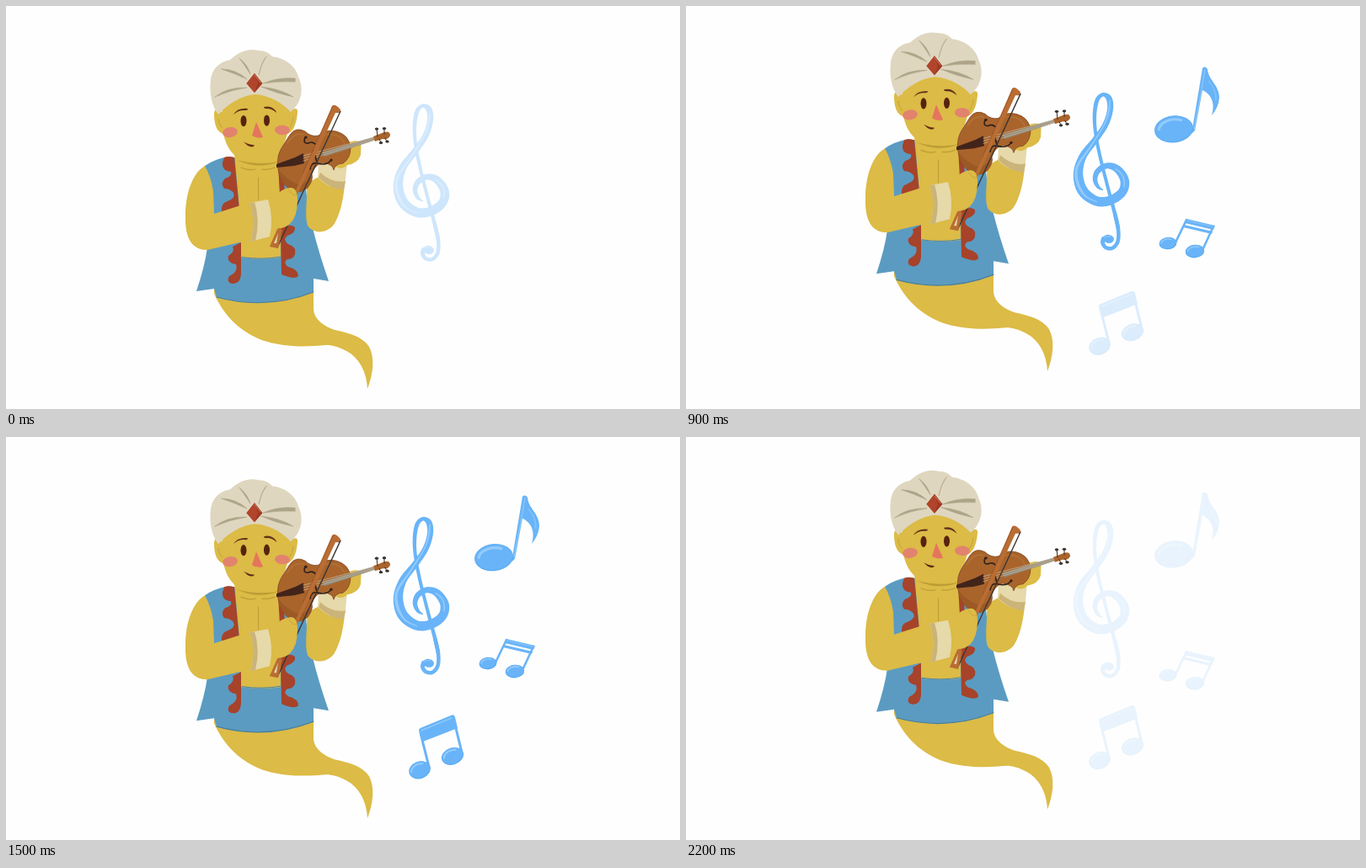
These frames come from a looping animation (800 by 479 pixels, 2300 ms). An HTML page with a canvas:

```html
<!DOCTYPE html>
<html lang="en">
<head>
<meta charset="utf-8">
<title>Violin genie</title>
<style>
html, body { margin: 0; width: 100%; height: 100%; overflow: hidden; background: #fefefe; }
canvas { display: block; width: 800px; height: 479px; }
</style>
</head>
<body>
<canvas id="stage"></canvas>
<script>
const LOOP = 2300, STEP = 100, W = 800, H = 479;
const BG = '#fefefe', SKIN = '#dcbb46', SKIN_DARK = '#bd9c35', BLUE = '#5b9bc1', RED = '#a6432a',
  WOOD = '#a9642c', WOOD_DARK = '#7f451d', BOW = '#b96d33', DARK = '#42241a',
  CREAM = '#dfd6bf', FOLD = '#aea488', CUFF = '#e6d9aa', CUFF_DARK = '#cbb47a',
  NOTE = '#69b4f8', SHINE = '#93cbfb', DEEP = '#55a7f2';

const ratio = window.devicePixelRatio || 1;
const canvas = document.getElementById('stage');
const layer = document.createElement('canvas');
canvas.width = layer.width = W * ratio;
canvas.height = layer.height = H * ratio;
const screen2d = canvas.getContext('2d');
const layer2d = layer.getContext('2d');
let ctx = screen2d;

function fill(d, color) {
  ctx.fillStyle = color;
  ctx.fill(d instanceof Path2D ? d : new Path2D(d));
}

function line(d, color, width) {
  ctx.strokeStyle = color;
  ctx.lineWidth = width;
  ctx.stroke(new Path2D(d));
}

function oval(x, y, rx, ry, color, turn = 0) {
  ctx.beginPath();
  ctx.ellipse(x, y, rx, ry, turn, 0, 7);
  ctx.fillStyle = color;
  ctx.fill();
}

// Smooth curve through [x, y, width] points, with a changing width.
function ribbon(pts) {
  const left = [], right = [];
  const mix = (a, b, c, d, u) => 0.5 * (2 * b + (c - a) * u +
    (2 * a - 5 * b + 4 * c - d) * u * u + (3 * b - a - 3 * c + d) * u * u * u);
  const at = (i, u) => [0, 1, 2].map(k => mix(
    pts[Math.max(i - 1, 0)][k], pts[i][k], pts[i + 1][k],
    pts[Math.min(i + 2, pts.length - 1)][k], u));
  for (let i = 0; i < pts.length - 1; i++) {
    for (let n = 0; n <= 10; n++) {
      const u = n / 10, p = at(i, u);
      const a = at(i, Math.max(u - 0.01, 0)), b = at(i, Math.min(u + 0.01, 1));
      const dx = b[0] - a[0], dy = b[1] - a[1], r = p[2] / 2 / (Math.hypot(dx, dy) || 1);
      left.push([p[0] - dy * r, p[1] + dx * r]);
      right.unshift([p[0] + dy * r, p[1] - dx * r]);
    }
  }
  const path = new Path2D();
  left.concat(right).forEach(([x, y]) => path.lineTo(x, y));
  path.closePath();
  return path;
}

const clefBody = ribbon([
  [513, 278, 4.5], [509, 260, 4.5], [500, 226, 4], [491, 190, 4], [486, 163, 4], [485, 142, 4.5],
  [488, 125, 5], [495, 118.5, 4.5], [502, 123, 7], [503.5, 136, 7], [498, 154, 7], [486, 172, 7.5],
  [471, 192, 9], [465.5, 213, 11.5], [471, 233, 12.5], [487, 245, 11.5], [504, 244, 11],
  [518, 234, 10.5], [520.5, 220, 10.5], [512, 207, 9], [500, 203, 7], [489, 209, 6.5],
  [485.5, 219, 5.5], [489, 228, 4], [495, 232, 1]
]);
const clefHook = ribbon([
  [509, 260, 4.5], [513, 278, 4.5], [512.5, 293, 4.5], [506, 301, 4.5], [498, 300, 4.5],
  [494.5, 294, 5], [497, 288, 6]
]);
const clefShine = ribbon([
  [503, 125, 1.5], [502, 137, 2], [496, 155, 1.5], [479, 182, 2], [464, 205, 3],
  [465, 224, 3.5], [474, 239, 2], [488, 246, 1]
]);

function tail() {
  fill('M247 334 L365 330 L365 361 C366 373 378 381 390 385 C409 389 423 393 431 405 ' +
    'C438 418 436 437 429 455 C428 434 419 418 404 410 C394 405 388 403 380 403 ' +
    'C360 405 334 406 310 399 C279 390 258 367 247 342 Z', SKIN);
}

function clothes() {
  fill('M236 190 Q247 182 264 179 L340 190 L356 216 Q359 258 383 327 L365 324 L365 340 ' +
    'Q309 362 250 346 L247 336 L226 339 Q236 309 239 287 Z', BLUE);
  line('M250 346 Q309 362 365 340', '#477f9f', 1.2);
  fill('M270 165 L325 165 L326 299 Q303 302 279 299 L277 240 Z', SKIN);
  line('M280 298.5 Q303 302 326 298', '#4d87a9', 1);
  fill('M259 180 Q264 178 271 180 L277 243 L256 244 Q255 234 263 232 Q273 228 270 222 ' +
    'Q266 217 259 217 Q254 211 260 205 Q269 202 267 197 Q256 196 257 186 Z', RED);
  fill('M279 281 L279 319 Q278 331 268 330 Q261 328 265 321 Q276 316 273 307 ' +
    'Q262 305 264 297 Q272 292 269 286 Z', RED);
  fill('M323 190 L329 190 L331 225 L325 225 Z', RED);
  fill('M326 264 Q337 258 343 263 Q344 270 334 273 Q328 278 335 283 Q345 286 343 295 ' +
    'Q341 301 334 301 Q328 305 335 310 Q347 313 347 321 Q343 326 327 319 Z', RED);
  fill('M274 183 Q299 195 324 185 Q300 190 274 183 Z', SKIN_DARK);
  line('M279 192 Q288 196 296 194 M304 194 Q312 195 319 192', SKIN_DARK, 1.2);
  line('M299.5 204 L299.5 231', SKIN_DARK, 1);
}

function head() {
  fill('M258 127 Q247 119 247 128 Q247 149 258 152 Z', SKIN);
  fill('M334 127 Q347 117 346 127 Q344 148 334 152 Z', SKIN);
  line('M252 134 Q253 142 257 145 M341 132 Q340 141 336 145', SKIN_DARK, 0.8);
  fill('M256 115 L258 151 C262 174 277 186 294 186 C315 186 330 172 334 151 L338 115 Q295 93 256 115 Z', SKIN);
  oval(266, 150, 9, 6, '#e2836e', -0.15);
  oval(328, 147.5, 9, 5.7, '#e2836e', 0.05);
  oval(282, 136.5, 3.5, 6.6, '#57230f');
  oval(309.5, 136, 3.5, 6.6, '#57230f');
  fill('M270 129 Q275 120.5 287 122 Q287 124 285 124 Q276 123 270 129 Z', '#65301a');
  fill('M306 120 Q317 117.5 321.5 127 Q315 121 308 122 Q306 121.5 306 120 Z', '#65301a');
  fill('M297 138 L305 156 Q298 158 292 154 Z', '#e5755c');
  fill('M282 161.5 Q288 165 295 165.5 Q293 169 287 166 Z', '#642b18');

  fill('M252 129 C244 119 241 103 243 88 C245 72 256 66 266 64 C277 54 288 50 300 53 ' +
    'C308 53 312 56 316 60 C332 62 344 72 347 84 C354 98 351 115 338 126 ' +
    'C328 115 312 106 296 105 C281 106 263 116 252 129 Z', CREAM);
  [
    'M277 62 Q287 70 290 81 Q283 70 277 62 Z',
    'M256 75 Q273 75 286 87 Q271 80 256 75 Z',
    'M248 108 Q263 96 286 97 Q266 100 248 108 Z',
    'M309 60 Q302 70 300 82 Q303 67 309 60 Z',
    'M343 86 Q323 84 305 92 Q324 89 343 90 Z',
    'M303 96 Q325 98 341 108 Q321 104 303 96 Z'
  ].forEach(d => {
    fill(d, FOLD);
    line(d, FOLD, 0.6);
  });
  fill('M295 80 L304.5 92 L295 103 L285.5 92 Z', '#9e3822');
  fill('M295 80 L299 92 L295 103 L285.5 92 Z', '#b0452b');
  line('M295 82 L302 91', '#d98b66', 0.8);
}

function farArm() {
  fill('M357 211 L371 203 L402 213 C400 233 396 249 389 260 C380 271 365 271 358 261 ' +
    'C354 249 358 232 357 211 Z', SKIN);
  fill('M371 186 L405 186 L402 216 Q386 220 370 204 Z', CUFF);
  fill('M373 198 Q387 211 403 208 L401 218 Q386 219 371 204 Z', CUFF_DARK);
  fill('M380 182 L407 162 Q420 157 421.5 166 L421 177 Q418 187 405 189 Q398 197 386 188 Z', SKIN);
}

function violin() {
  const body = 'M337 153 Q344 143 355 149 Q362 156 371 154 Q379 146 392 149 Q407 153 409 168 ' +
    'Q409 181 400 187 Q391 187 389 195 Q388 188 376 186 Q366 189 363 200 ' +
    'Q365 207 358 216 Q350 223 341 220 Q326 213 323 194 Q320 177 330 164 Z';
  fill(body, WOOD);
  line(body, WOOD_DARK, 0.8);
  fill('M323 194 Q326 213 341 220 Q350 223 358 216 Q362 211 363 202 Q357 211 347 212 Q333 207 323 194 Z', '#9b5925');
  line('M334 163 Q343 149 353 153 M378 153 Q397 150 402 164', '#b67638', 1.2);
  line('M355 156 Q352 164 359 163 Q364 160 369 166 M361 194 Q362 185 370 187 Q381 190 386 183', '#2f211b', 1.6);
  oval(356, 156, 1.6, 1.6, '#2f211b');
  oval(386, 183, 1.6, 1.6, '#2f211b');
  fill('M321 188 L343 180 L353 175 L354 187 L342 190 L321 192 Z', DARK);
  fill('M375 174 L437 155.5 L438 159.5 L378 179 Z', '#948a78');
  line('M353 178 L437 156 M353 181 L437 157.5 M353 184 L437 159', '#c8bda6', 0.7);
  line('M365 172 L369 185', DARK, 2);
  fill('M436 155 L449 150 Q456 148 456 154 Q454 159 447 158 L438 161 Z', WOOD);
  line('M441 155 L440 146 M449 152 L449 146 M443 158 L445 162 M450 157 L452 161', DARK, 1);
  [[440, 146], [449, 145.5], [445, 162.5], [452.5, 161]].forEach(([x, y]) => oval(x, y, 2.2, 1.6, '#37332f'));
}

function bow() {
  fill('M387 119 Q390 115 397 123 L396 127 L391 127 L318 284 L313 286 L352 201 Z', BOW);
  line('M388 119 L352 199', '#965127', 0.8);
  line('M397 125 L322 287', '#3d3733', 1.4);
  fill('M313 286 L322 265 L328 266 L323 288 Z', BOW);
  fill('M318 282 L323 270 L321 282 Z', CUFF);
}

function nearArm() {
  fill('M236 190 C222 198 213 222 213 249 C212 278 222 290 239 290 L294 277 L291 233 ' +
    'L247 247 L246 220 Q243 202 236 190 Z', SKIN);
  fill('M307 231 L318 227 Q327 217 337 216 Q346 215 346 231 Q346 250 337 259 Q328 267 314 263 L307 270 Z', SKIN);
  line('M336 219 Q341 227 345 224', SKIN_DARK, 0.7);
  fill('M289 234 L311 230 Q318 252 313 274 L290 280 Q297 255 289 234 Z', CUFF);
  fill('M289 234 L295 233 Q302 255 296 279 L290 280 Q297 255 289 234 Z', CUFF_DARK);
}

function genie() {
  tail();
  clothes();
  head();
  farArm();
  violin();
  bow();
  nearArm();
}

function noteHead(x, y, rx, ry, turn) {
  oval(x, y, rx, ry, DEEP, turn);
  oval(x, y - 0.4, rx - 0.6, ry - 0.7, NOTE, turn);
  ctx.beginPath();
  ctx.ellipse(x, y, rx * 0.78, ry * 0.72, turn, 3.3, 5.3);
  ctx.strokeStyle = SHINE;
  ctx.lineWidth = ry * 0.2;
  ctx.stroke();
}

function clef() {
  fill(clefBody, NOTE);
  fill(clefHook, NOTE);
  oval(501.5, 290, 6.5, 5, NOTE, 0.2);
  fill(clefShine, SHINE);
  line('M510 207 Q522 213 520 228', SHINE, 1.5);
  line('M497 288 Q500 286 504 287', SHINE, 1);
}

function eighth() {
  fill('M613 76 Q616 73 619 77 C620 90 633 96 633 111 Q632 123 624 132 C629 116 622 106 613 102 ' +
    'L604 150 L600 154 Z', NOTE);
  noteHead(579, 148.5, 23, 16, -0.12);
  line('M616 78 L612 101 L603 148', SHINE, 1);
  line('M620 91 Q630 102 629 114', SHINE, 1);
}

function sixteenths() {
  line('M581 268 L594 241 M613 277 L626 249', NOTE, 2.6);
  fill('M594 240 L628 248 L626 253 L592 245 Z', NOTE);
  fill('M591 247 L625 255 L624 258 L590 250 Z', NOTE);
  line('M595 242 L625 249', SHINE, 0.8);
  noteHead(572, 269, 10.5, 7.2, -0.1);
  noteHead(604, 278.5, 11.2, 7.8, -0.1);
}

function eighths() {
  line('M502.5 394 L492 352 M541.5 377 L531 334', NOTE, 3);
  fill('M490 349 Q490 346 494 345 L528 331 Q532 329 533 333 L536 346 L495 362 Z', NOTE);
  line('M493 349 L529 334', SHINE, 1.2);
  noteHead(491, 396, 13, 10.2, -0.35);
  noteHead(530, 379.5, 13.4, 10, -0.35);
}

// 11 px swing; speed in degrees per millisecond.
const swing = (t, speed, phase) => 11 * Math.cos((phase + speed * t) * Math.PI / 180);
const clamp = v => Math.min(1, Math.max(0, v));

const notes = [
  { draw: clef, start: -110, y: t => swing(t, 0.1, 13) - 10.7 },
  { draw: eighth, start: 130, y: t => (500 - t) * 0.0053 },
  { draw: sixteenths, start: 400, y: t => 11 - swing(t - 1530, 0.16, 0) },
  { draw: eighths, start: 820, y: t => swing(t - 1600, 0.1, 90) - 2 }
];

// Each note is drawn on its own layer, so that it fades as a whole.
function showNote(note, t) {
  const alpha = clamp((t - note.start) / 350) * clamp((2300 - t) / 700);
  if (!alpha) return;
  ctx = layer2d;
  ctx.setTransform(ratio, 0, 0, ratio, 0, 0);
  ctx.clearRect(0, 0, W, H);
  ctx.lineCap = ctx.lineJoin = 'round';
  ctx.translate(0, note.y(t));
  note.draw();
  ctx = screen2d;
  ctx.globalAlpha = alpha;
  ctx.drawImage(layer, 0, 0, W, H);
  ctx.globalAlpha = 1;
}

function render(t) {
  ctx.setTransform(ratio, 0, 0, ratio, 0, 0);
  ctx.fillStyle = BG;
  ctx.fillRect(0, 0, W, H);
  ctx.lineCap = ctx.lineJoin = 'round';
  notes.forEach(note => showNote(note, t));
  ctx.translate(0, swing(t, 0.2, 20) - 10.3);
  genie();
}

let begin;
function tick(now) {
  begin ??= now;
  const t = (now - begin) % LOOP;
  render(Math.floor(t / STEP) * STEP);
  requestAnimationFrame(tick);
}
render(0);
requestAnimationFrame(tick);
</script>
</body>
</html>
```
